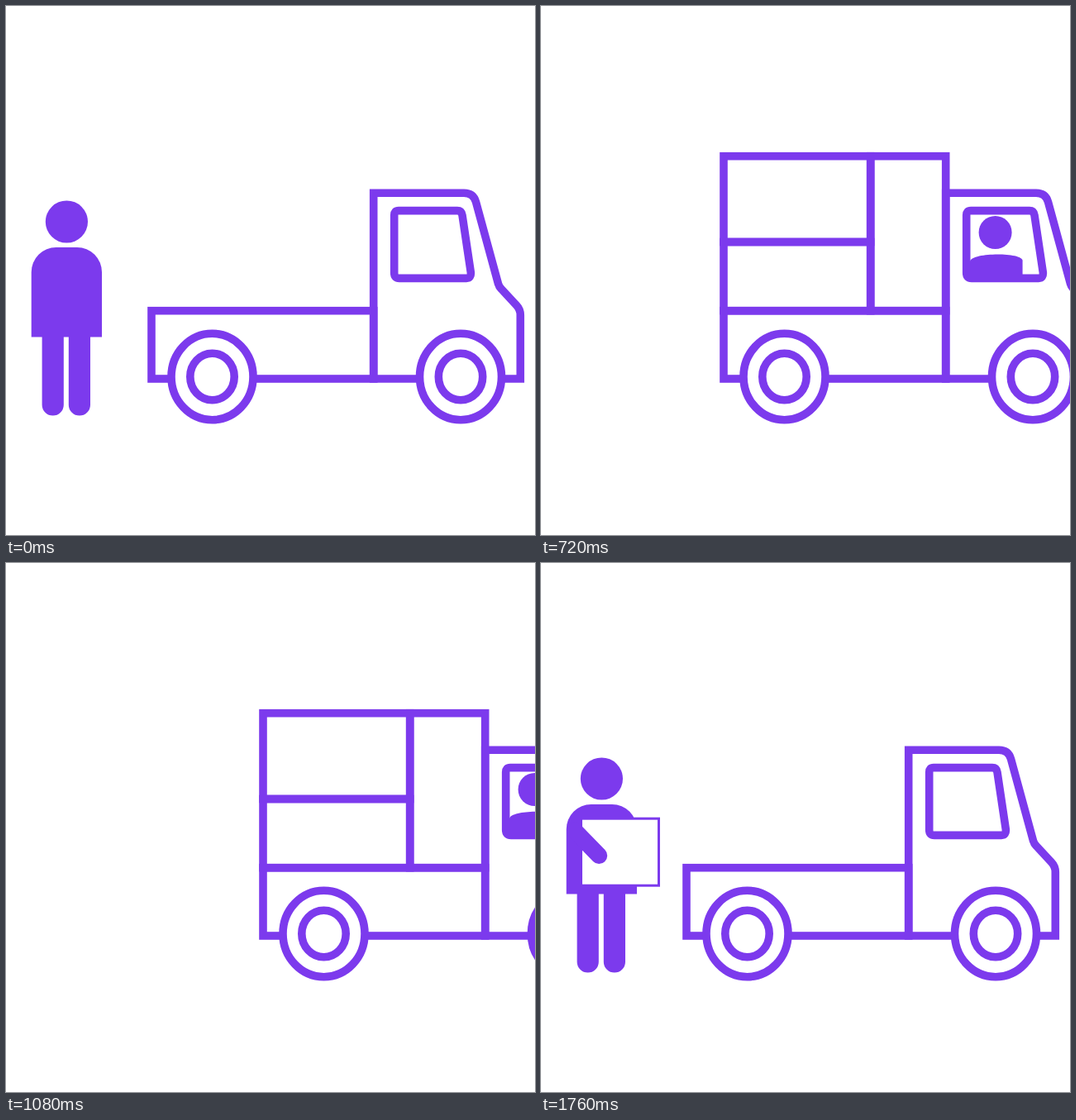
Animation of 640 by 640 pixels, one loop 1.84 s. Source, as an HTML page:

```html
<!DOCTYPE html>
<html lang="en">
<head>
<meta charset="utf-8">
<title>Loading the truck</title>
<style>
  html, body { margin: 0; width: 100%; height: 100%; overflow: hidden; background: #fff; }
  svg { display: block; width: 100vw; height: 100vh; }
  .line { fill: none; stroke: #7c3aed; stroke-width: 9.6; }
  .solid { fill: #7c3aed; }
  .wheel { fill: #fff; }
</style>
</head>
<body>
<svg viewBox="0 0 640 640">
  <defs>
    <g id="wheel" class="line">
      <ellipse class="wheel" rx="49.5" ry="52.2"/>
      <ellipse rx="26.7" ry="28.2"/>
    </g>
  </defs>

  <g id="worker">
    <g class="solid">
      <circle cx="73.4" cy="261" r="25.6"/>
      <path d="M30.7 400.5V322a30 30 0 0 1 30-30H86a30 30 0 0 1 30 30V400.5z"/>
      <path d="M43.6 400H69.8V482.5a13.1 13.1 0 0 1-26.2 0z"/>
      <path d="M75.8 400H102V482.5a13.1 13.1 0 0 1-26.2 0z"/>
    </g>
    <g id="parcel" stroke="#7c3aed">
      <rect x="48.5" y="309.2" width="94" height="81" fill="#fff" stroke-width="3"/>
      <path d="M41 324L70.2 354" stroke-width="20" stroke-linecap="round"/>
    </g>
  </g>

  <g id="truck">
    <g class="line">
      <rect class="cargo" x="353.7" y="181.7" width="91" height="187"/>
      <rect class="cargo" x="176" y="285.5" width="177.7" height="83.2"/>
      <rect class="cargo" x="176" y="181.7" width="177.7" height="103.8"/>
      <rect x="176" y="368.7" width="268.7" height="82.3"/>
      <path d="M444.7 451V226.2H554Q565.5 226.2 568.5 237L595.5 336Q596.5 339.5 599 342L617.5 362Q622.3 367 622.3 374V451z"/>
      <path d="M469.7 253Q469.7 247.6 475 247.6H546Q551 247.6 552 253L562.3 322Q563 329.4 557 329.4H476Q469.7 329.4 469.7 323z"/>
    </g>
    <g id="driver" class="solid">
      <circle cx="504.6" cy="274" r="20"/>
      <path d="M474 326V309C476 298 537 298 537.6 308V326z"/>
    </g>
    <use href="#wheel" x="249.5" y="448.5"/>
    <use href="#wheel" x="550" y="448.5"/>
  </g>
</svg>
<script>
  const TICK = 40, TICKS = 46, TURN = 23, BOARDING = 16, DEPARTURE = 17;
  const byId = id => document.getElementById(id);
  const worker = byId("worker"), parcel = byId("parcel"), driver = byId("driver"), truck = byId("truck");
  const cargo = document.querySelectorAll(".cargo");
  const show = (element, visible) => element.style.display = visible ? "" : "none";

  function draw(now) {
    const tick = Math.floor(now / TICK) % TICKS;
    const step = tick < TURN ? tick : TICKS - tick; // the second half plays backwards

    // Each five-step round: wait, carry a parcel for two steps, set it down.
    const loaded = Math.floor((step + 2) / 5);
    const carrying = loaded < cargo.length && [1, 2].includes(step % 5);
    cargo.forEach((box, i) => show(box, i < loaded));
    show(parcel, carrying);
    show(worker, step < BOARDING);
    show(driver, step >= BOARDING);

    // Constant acceleration, one larger jump per tick.
    const n = Math.max(0, step - DEPARTURE);
    truck.setAttribute("transform", `translate(${45 * n * (n + 1) / 2} 0)`);
    requestAnimationFrame(draw);
  }
  draw(0);
</script>
</body>
</html>
```
